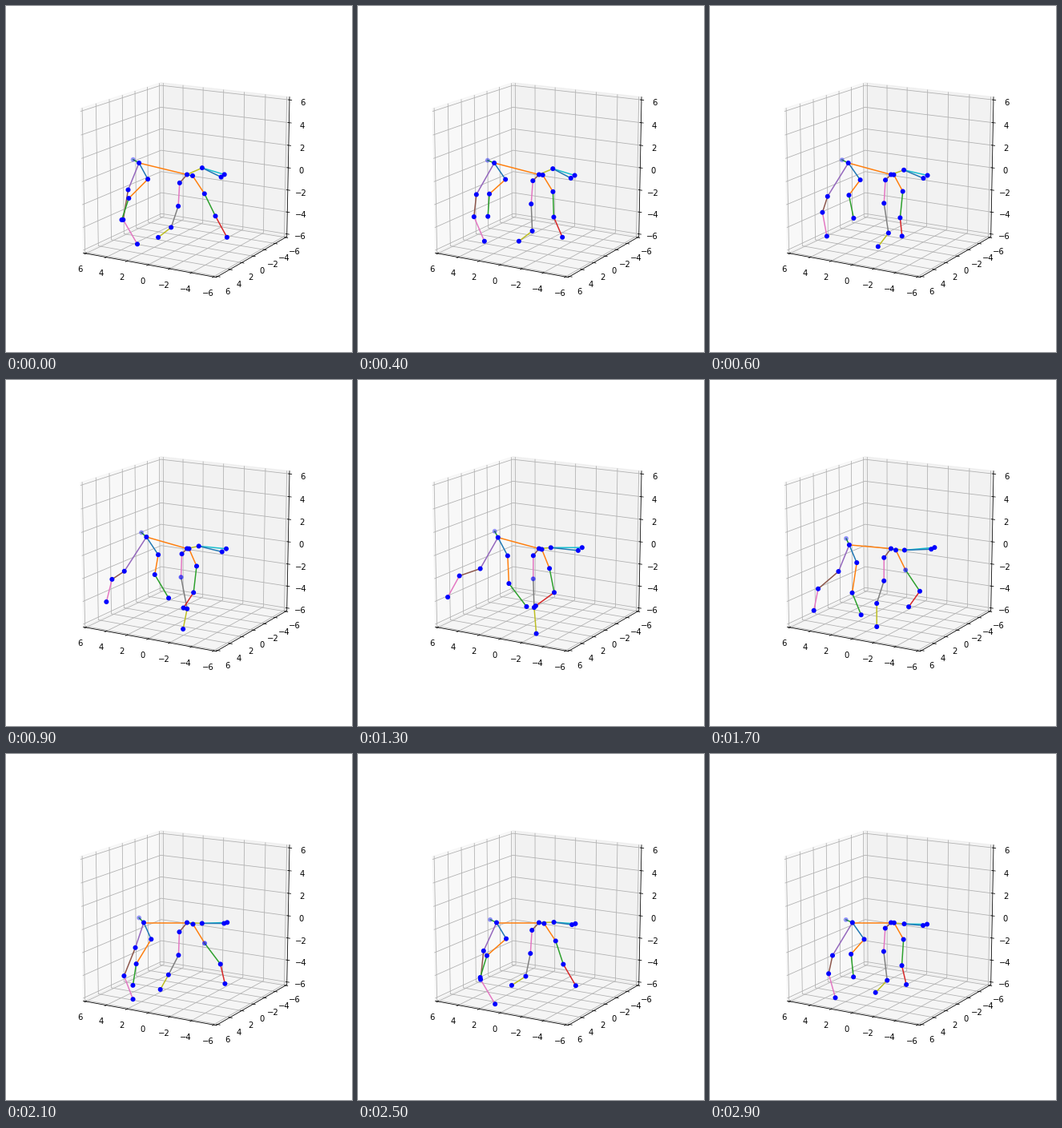
Recreate the animation shown at these times as a matplotlib script. Size 432 px wide and 432 px high, loop 3 s.

```python
import numpy as np
import matplotlib.pyplot as plt
from matplotlib.animation import FuncAnimation

SIZE, DPI = 432, 72
FRAMES, INTERVAL = 30, 100
STRIDE = 23.7                # frames in one gait cycle
CHEST = 226 + 210.5j         # fixed joint; x + iy in pixels, y down

# Each bone swings on an ellipse around its rest offset from the parent joint:
# name: parent, cycle colour, rest, cosine part, sine part
BONES = {
    "hip":  ("chest", 1, -55.3 - 14.5j, -4.6, 1.9),
    "tail": ("hip", 2, -6 - 5.8j, -1.4 + 1.5j, -1.9 + 2j),
    "neck": ("chest", 8, 16.7 - 5j, 2.2 - 3.4j, -0.6 - 0.8j),
    "ear":  ("neck", 9, 33 + 4.5j, -5.2 + 3.8j, -3.6 + 2.3j),
    "nose": ("neck", 0, 28.4 + 8j, -4.7 + 3.5j, -4.1 + 2.4j),

    "right thigh": ("hip", 4, -19 + 37j, 5.4 - 3.5j, -6.8 + 4.7j),
    "right shin":  ("right thigh", 5, -15 + 22.5j, 8.8 + 14.9j, 8.8 - 2.3j),
    "right paw":   ("right shin", 6, 1.8 + 28.6j, 15.9 + 1.8j, 4 + 1.2j),

    "left thigh": ("hip", 0, 12 + 21.5j, -1 - 1.3j, 2.9 - 0.4j),
    "left shin":  ("left thigh", 1, -11.3 + 28j, -12.5 - 4.1j, -3.1 - 9j),
    "left paw":   ("left shin", 2, 6.8 + 28j, -15.6 - 1.1j, -1.2 + 0.7j),

    "left shoulder": ("chest", 5, -8 + 9.2j, -1.2 + 1.2j, 1 - 2.4j),
    "left elbow": ("left shoulder", 6, -1 + 29j, -0.7, -0.8),
    "left wrist": ("left elbow", 7, -2.5 + 32j, -6.4 - 5.5j, 8 + 5.1j),
    "left hand":  ("left wrist", 8, -7.4 + 22j, -8.7 - 9.5j, -5.8 - 5.3j),

    "right shoulder": ("chest", 0, 5 + 1.1j, 2 + 0.4j, -1.5 - 0.9j),
    "right elbow": ("right shoulder", 1, 12 + 22.8j, 2.8 - 0.4j, -0.7 - 2j),
    "right wrist": ("right elbow", 2, 8 + 29.5j, 5.7 - 1.6j, -11.2 + 3.4j),
    "right hand":  ("right wrist", 3, -3.8 + 21.7j, 18.2 + 4.8j, 6.5 + 1.3j),
}

# The body tips forward halfway through; the head bones counter it
LEAN = {"hip": 6 + 14.5j, "neck": 8j, "ear": -7j, "nose": -9j}

# Gait phase at which an elbow is turned away and drawn faded
AWAY = {"left elbow": np.radians(165), "right elbow": np.radians(290)}


def smoothstep(start, end, value):
    u = np.clip((value - start) / (end - start), 0, 1)
    return u * u * (3 - 2 * u)


def pose(frame):
    """Screen position of every joint as x + iy."""
    phase = 2 * np.pi * frame / STRIDE
    lean = smoothstep(12, 20, frame)
    joints = {"chest": CHEST}
    for name, (parent, _, rest, cos, sin) in BONES.items():
        swing = cos * np.cos(phase) + sin * np.sin(phase)
        joints[name] = joints[parent] + rest + swing + lean * LEAN.get(name, 0)
    return joints


def opacity(name, frame):
    if name == "tail":
        return 0.3
    phase = 2 * np.pi * frame / STRIDE
    away = name in AWAY and np.cos(phase - AWAY[name]) > 0.7
    return 0.51 if away else 1


fig = plt.figure(figsize=(SIZE / DPI, SIZE / DPI), dpi=DPI, facecolor="white")

# Grid box: a cube stretched to the full axes rectangle
box = fig.add_axes([0.125, 0.125, 0.775, 0.755], projection="3d")
box.apply_aspect = lambda position=None: None
box.patch.set_visible(False)
box.set_box_aspect((1, 1, 1), zoom=3 ** 0.5 / 1.8294640721620434)
box.view_init(elev=15, azim=120)
ticks = range(-6, 7, 2)
box.set(xlim=(-6.25, 6.25), ylim=(-6.25, 6.25), zlim=(-6.25, 6.25),
        xticks=ticks, yticks=ticks, zticks=ticks)

# Skeleton layer in pixel coordinates
stage = fig.add_axes([0, 0, 1, 1], zorder=5)
stage.set(xlim=(0, SIZE), ylim=(SIZE, 0))
stage.axis("off")

lines = {name: stage.plot([], [], color=f"C{bone[1]}", lw=1.5)[0]
         for name, bone in BONES.items()}
start = np.array(list(pose(0).values()))
dots = stage.scatter(start.real, start.imag, s=20, color="blue", lw=1.5,
                     zorder=3)


def update(frame):
    joints = pose(frame)
    for name, line in lines.items():
        ends = np.array([joints[BONES[name][0]], joints[name]])
        line.set_data(ends.real, ends.imag)
    points = np.array(list(joints.values()))
    dots.set_offsets(np.column_stack([points.real, points.imag]))
    colors = [(0, 0, 1, opacity(name, frame)) for name in joints]
    dots.set_facecolor(colors)
    dots.set_edgecolor(colors)
    return [*lines.values(), dots]


anim = FuncAnimation(fig, update, frames=FRAMES, interval=INTERVAL,
                     repeat=True, repeat_delay=0)
plt.show()
```
